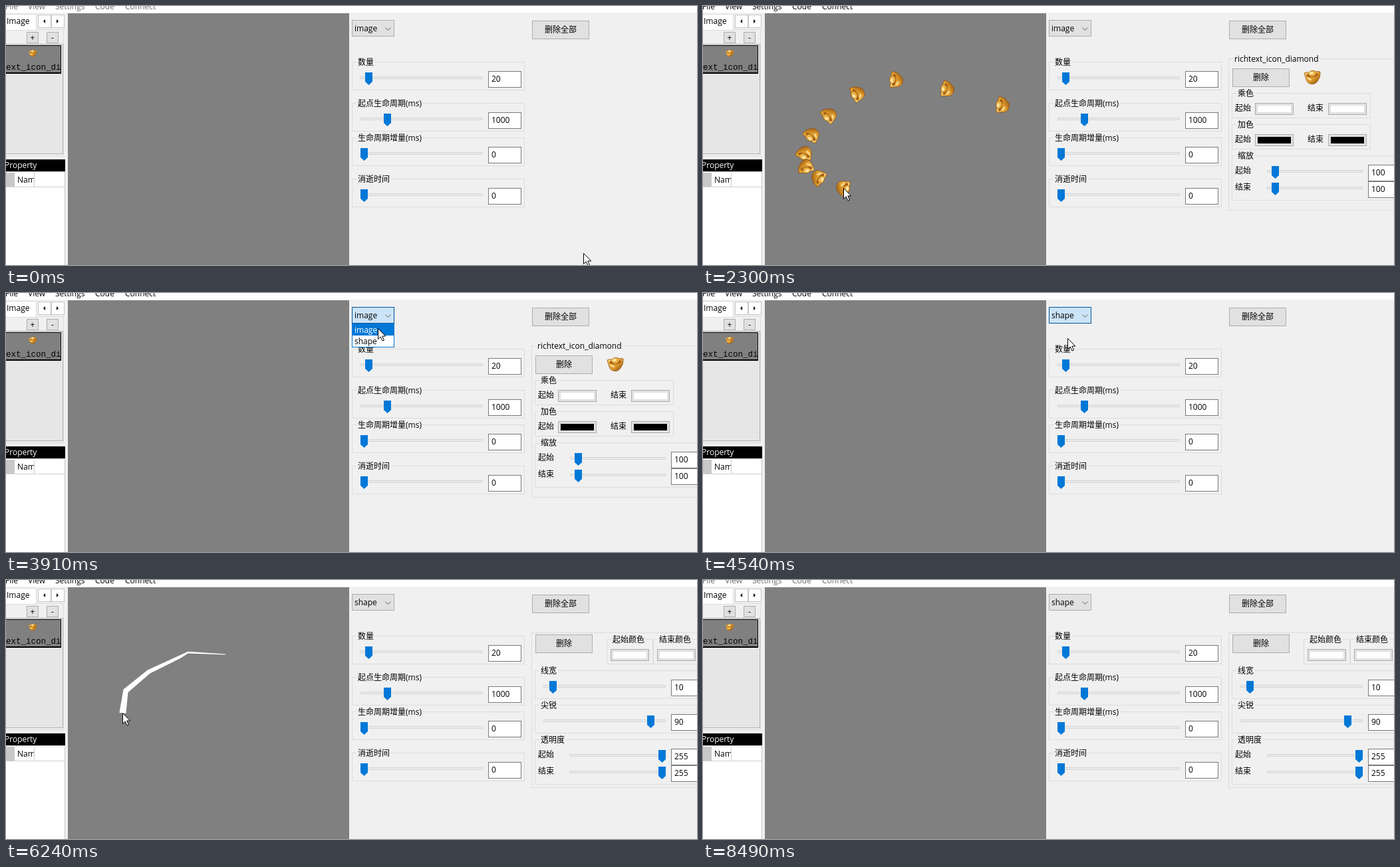
These frames come from a looping animation (1039x390 px, 8560 ms). An HTML page with a canvas:

```html
<!DOCTYPE html>
<html lang="zh-CN">
<head>
<meta charset="utf-8">
<title>Particle editor</title>
<style>
html, body { margin: 0; width: 100%; height: 100%; overflow: hidden; background: #f0f0f0; }
canvas { display: block; }
</style>
</head>
<body>
<canvas id="stage" width="1039" height="390"></canvas>
<script>
const ctx = document.getElementById('stage').getContext('2d');
const LOOP = 8560, START = 70, TICK = 76.6;
const UI = '12px "Open Sans", "Noto Sans CJK SC", "Noto Sans CJK", sans-serif';
const MONO = '12.5px "Liberation Mono", monospace';
const FACE = '#f0f0f0', GREY = '#808080', LINE = '#dcdcdc', BLUE = '#0078d7';
const LIST = [38, 75], PANEL = [846, 121], COMBO = [557, 36], OPTION = [563, 67];

// Pointer gestures: smooth curves through points spaced `step` ticks apart,
// each held at its end until the next one begins.
const gestures = [
  { at: 0, step: 7, via: [[868, 372], LIST, PANEL] },
  { at: 14, step: 2, via: [PANEL, [762, 153], [600, 180], [450, 150], [290, 112], [190, 165],
    [153, 222], [174, 258], [270, 281], [464, 252], [467, 183], [376, 140], [600, 92], [615, 84], [597, 80]] },
  { at: 42, step: 5, via: [[597, 80], COMBO, OPTION] },
  { at: 58, step: 5, via: [[548, 68], LIST, PANEL] },
  { at: 72, step: 1, via: [PANEL, [760, 140]] },
  { at: 73, step: 2, via: [[760, 140], [330, 112], [261, 116], [180, 167], [204, 225], [388, 207],
    [434, 110], [408, 86], [200, 140], [210, 235], [560, 330], [765, 390]] }
];

function spline(a, b, c, d, f) {
  return b + f / 2 * (c - a + f * (2 * a - 5 * b + 4 * c - d + f * (3 * (b - c) + d - a)));
}

function pointer(tick) {
  const { at, step, via } = gestures.findLast(g => g.at <= tick);
  const last = via.length - 1, u = Math.min((tick - at) / step, last);
  const i = Math.min(Math.floor(u), last - 1);
  const [a, b, c, d] = [-1, 0, 1, 2].map(n => via[Math.max(0, Math.min(last, i + n))]);
  return [0, 1].map(axis => spline(a[axis], b[axis], c[axis], d[axis], u - i));
}

// Pointer positions inside the grey canvas, for ticks first..last.
function emitted(first, last) {
  const out = [];
  for (let k = first; k <= last; k++) {
    const [x, y] = pointer(k);
    if (x > 93 && x < 516) out.push({ k, x, y });
  }
  return out;
}

function rect(x, y, w, h, fill) {
  ctx.fillStyle = fill;
  ctx.fillRect(x, y, w, h);
}

function box(x, y, w, h, fill, border) {
  rect(x, y, w, h, border);
  rect(x + 1, y + 1, w - 2, h - 2, fill);
}

function text(s, x, y, color = '#000', font = UI) {
  ctx.font = font;
  ctx.fillStyle = color;
  ctx.fillText(s, x, y);
}

function clipped(x, y, w, h, draw) {
  ctx.save();
  ctx.beginPath();
  ctx.rect(x, y, w, h);
  ctx.clip();
  draw();
  ctx.restore();
}

function shape(points, fill) {
  ctx.beginPath();
  points.forEach(([x, y]) => ctx.lineTo(x, y));
  ctx.closePath();
  ctx.fillStyle = fill;
  ctx.fill();
}

function polyline(points, color) {
  ctx.beginPath();
  points.forEach(([x, y]) => ctx.lineTo(x + .5, y + .5));
  ctx.strokeStyle = color;
  ctx.lineWidth = 1;
  ctx.stroke();
}

function button(label, x, y, w, h) {
  box(x, y, w, h, '#e1e1e1', '#adadad');
  ctx.textAlign = 'center';
  text(label, x + w / 2, y + h / 2 + 4);
  ctx.textAlign = 'left';
}

function group(label, x, y, w, h) {
  box(x, y, w, h, FACE, LINE);
  if (!label) return;
  ctx.font = UI;
  rect(x + 7, y, ctx.measureText(label).width + 4, 1, FACE);
  text(label, x + 9, y + 5);
}

function slider(left, right, y, value, max) {
  box(left, y - 2, right - left, 4, '#e7eaea', '#d6d6d6');
  const x = Math.round(left + (right - left - 11) * value / max), top = y - 8;
  shape([[x, top], [x + 11, top], [x + 11, top + 14], [x + 5.5, top + 19], [x, top + 14]], BLUE);
  box(right + 8, y - 10, 50, 25, '#fff', '#7a7a7a');
  text(value, right + 13, y + 6);
}

function sliderGroup(label, x, y, value, max) {
  group(label, x, y, 260, 43);
  slider(x + 13, x + 197, y + 24, value, max);
}

function sliderPair(label, y, value, max) {
  group(label, 795, y, 260, 68);
  ['起始', '结束'].forEach((name, i) => {
    text(name, 800, y + 27 + i * 25);
    slider(848, 992, y + 24 + i * 25, value, max);
  });
}

function swatch(x, y, color) {
  box(x, y, 58, 18, '#e1e1e1', '#adadad');
  rect(x + 4, y + 4, 50, 10, color);
}

function colorPair(label, y, color) {
  group(label, 795, y, 209, 38);
  ['起始', '结束'].forEach((name, i) => {
    text(name, 800 + i * 109, y + 27);
    swatch(830 + i * 110, y + 15, color);
  });
}

function ellipse(x, y, rx, ry, turn, fill) {
  ctx.beginPath();
  ctx.ellipse(x, y, rx, ry, turn, 0, Math.PI * 2);
  ctx.fillStyle = fill;
  ctx.fill();
}

function ingot(x, y, scale = 1, angle = 0) {
  ctx.save();
  ctx.translate(x, y);
  ctx.rotate(angle);
  ctx.scale(scale, scale);
  const gold = ctx.createLinearGradient(-8, -6, 7, 11);
  gold.addColorStop(0, '#f6c865');
  gold.addColorStop(.55, '#dc9a2c');
  gold.addColorStop(1, '#97530f');
  ctx.beginPath();
  ctx.moveTo(-12, -6);
  ctx.quadraticCurveTo(-8, -8, -5, -7);
  ctx.quadraticCurveTo(0, -12, 6, -8);
  ctx.quadraticCurveTo(9, -9, 12, -8);
  ctx.quadraticCurveTo(13, 0, 8, 6);
  ctx.quadraticCurveTo(5, 11, -1, 10.5);
  ctx.quadraticCurveTo(-7, 10, -9, 4);
  ctx.closePath();
  ctx.fillStyle = gold;
  ctx.fill();
  ctx.strokeStyle = '#8f5215';
  ctx.lineWidth = .8;
  ctx.stroke();
  ellipse(0, -3, 9, 3.2, -.08, '#a35f16');
  ellipse(0, -5, 5.5, 4, 0, '#e9b044');
  ellipse(-1, -6, 3, 1.8, -.2, '#ffe9ae');
  ellipse(-4, 3, 3.5, 1.2, .5, '#ffdf94');
  ctx.restore();
}

function arrowCursor([x, y]) {
  x = Math.round(x) + .5;
  y = Math.round(y) + .5;
  const outline = [[0, 0], [0, 16], [3.7, 12.5], [6.5, 18.5], [9, 17.5], [6.3, 11.5], [11.3, 11.5]]
    .map(([dx, dy]) => [x + dx, y + dy]);
  shape(outline, '#fff');
  ctx.strokeStyle = '#000';
  ctx.lineWidth = 1;
  ctx.stroke();
}

function leftSide(active) {
  rect(0, 0, 1039, 10, '#fff');
  const menu = [['File', -1], ['View', 33], ['Settings', 74], ['Code', 134], ['Connect', 179]];
  menu.forEach(([s, x]) => text(s, x, 5, active ? '#000' : '#6d6d6d'));

  box(-2, 35, 89, 191, FACE, LINE);
  box(-2, 12, 48, 25, '#fff', LINE);
  text('Image', 1, 27);
  [48, 68].forEach(x => box(x, 13, 20, 20, '#fdfdfd', '#c6c6c6'));
  shape([[56, 23], [59, 20], [59, 26]], '#000');
  shape([[79, 23], [76, 20], [76, 26]], '#000');
  button('+', 31, 39, 18, 17);
  button('-', 61, 39, 18, 17);

  box(-2, 57, 88, 166, '#e6e6e6', '#b4b4b4');
  rect(-2, 59, 85, 43, '#000');
  rect(-2, 60, 84, 40, GREY);
  ingot(40, 71, .5);
  clipped(0, 60, 82, 40, () => text('ext_icon_diamond', 0, 96, '#000', MONO));

  rect(0, 231, 89, 18, '#000');
  text('Property', -2, 244, '#fff');
  box(-2, 249, 91, 145, '#fff', '#c8c8c8');
  rect(0, 251, 13, 21, '#c8c8c8');
  rect(0, 272, 88, 1, '#cfcfcf');
  rect(42, 251, 1, 21, '#cfcfcf');
  clipped(13, 250, 29, 22, () => text('Name', 17, 266));
  rect(93, 11, 423, 379, GREY);
}

function combo(t) {
  let fill = '#e1e1e1', border = '#adadad';
  if (t >= 3600 && t < 3830) [fill, border] = ['#e5f1fb', BLUE];
  if (t >= 3830 && t < 4690) [fill, border] = ['#cce4f7', '#005499'];
  box(520, 21, 64, 25, fill, border);
  text(t < 4540 ? 'image' : 'shape', 524, 38);
  polyline([[570, 32], [574, 36], [578, 32]], '#555');
}

function dropdown(selected) {
  box(520, 46, 64, 36, '#fff', BLUE);
  ['image', 'shape'].forEach((name, i) => {
    if (i === selected) rect(521, 47 + i * 17, 62, 17, BLUE);
    text(name, 524, 60 + i * 17, i === selected ? '#fff' : '#000');
  });
}

function commonControls(t) {
  combo(t);
  button('删除全部', 791, 22, 86, 28);
  sliderGroup('数量', 520, 84, 20, 500);
  sliderGroup('起点生命周期(ms)', 520, 146, 1000, 5000);
  sliderGroup('生命周期增量(ms)', 520, 198, 0, 5000);
  sliderGroup('消逝时间', 520, 260, 0, 5000);
}

function imagePanel() {
  group('richtext_icon_diamond', 790, 79, 270, 229);
  button('删除', 796, 94, 86, 28);
  ingot(916, 107);
  colorPair('乘色', 131, '#fff');
  colorPair('加色', 178, '#000');
  sliderPair('缩放', 225, 100, 2000);
}

function shapePanel() {
  group('', 790, 79, 270, 234);
  button('删除', 796, 82, 86, 28);
  ['起始颜色', '结束颜色'].forEach((label, i) => {
    group(label, 903 + i * 70, 89, 70, 38);
    swatch(909 + i * 70, 104, '#fff');
  });
  sliderGroup('线宽', 795, 136, 10, 200);
  sliderGroup('尖锐', 795, 188, 90, 100);
  sliderPair('透明度', 240, 255, 255);
}

// The panel for one moment before its controls are painted.
function unpaintedPanel() {
  group('', 790, 79, 270, 234);
  [128, 180].forEach(y =>
    polyline([[800, y + 24], [795, y + 24], [795, y], [844, y], [844, y + 22]], GREY));
  polyline([[840, 256], [795, 256], [795, 232], [844, 232], [844, 254]], GREY);
  [150, 202, 254, 279].forEach(y => box(1000, y, 50, 25, FACE, '#7a7a7a'));
}

function particles(tick) {
  emitted(Math.max(18, tick - 12), Math.min(tick, 36)).forEach(({ k, x, y }) => {
    const [px, py] = pointer(k - 1);
    ingot(x, y, 1, Math.atan2(y - py, x - px) + Math.PI / 2);
  });
}

function ribbon(tick) {
  const points = emitted(Math.max(74, tick - 10), Math.min(tick, 93));
  const last = points.length - 1;
  if (last < 1) return;
  const left = [], right = [];
  points.forEach(({ x, y }, i) => {
    const a = points[Math.max(0, i - 1)], b = points[Math.min(last, i + 1)];
    const angle = Math.atan2(b.y - a.y, b.x - a.x), half = .5 + 4.5 * i / last;
    const dx = -Math.sin(angle) * half, dy = Math.cos(angle) * half;
    left.push([x + dx, y + dy]);
    right.unshift([x - dx, y - dy]);
  });
  shape([...left, ...right], '#fff');
}

function draw(t) {
  const tick = Math.max(0, Math.floor((t - START) / TICK));
  rect(0, 0, 1039, 390, FACE);
  leftSide(t >= 680 && t < 8490);
  commonControls(t);

  if (t >= 1220 && t < 4540) imagePanel();
  if (t >= 5540 && t < 5630) unpaintedPanel();
  if (t >= 5630) shapePanel();

  clipped(93, 11, 423, 379, () => {
    if (t < 3680) particles(tick);
    else if (t < 7720) ribbon(tick);
  });
  if (t >= 3900 && t < 4540) dropdown(t < 4140 ? 0 : 1);
  if (tick < 95) arrowCursor(pointer(tick));
}

function frame(now) {
  draw(now % LOOP);
  requestAnimationFrame(frame);
}
requestAnimationFrame(frame);
</script>
</body>
</html>
```
